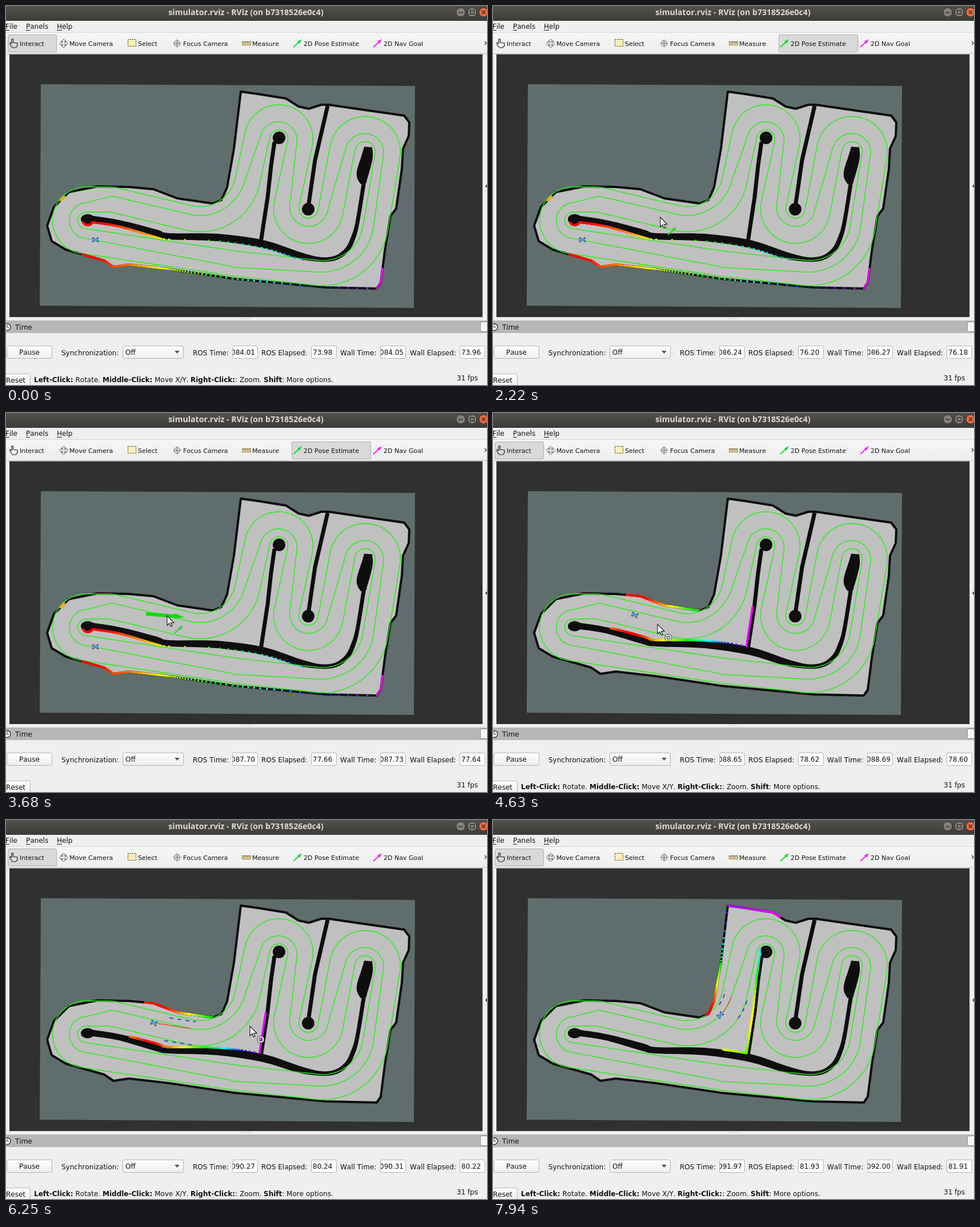
Recreate the animation shown at these times as an HTML page with a canvas. Size 842x664 px, loop 7990 ms.

```html
<!DOCTYPE html>
<html lang="en">
<head>
<meta charset="utf-8">
<title>Simulator view</title>
<style>
html, body { margin: 0; width: 100%; height: 100%; overflow: hidden; background: #efefef; }
canvas { display: block; }
</style>
</head>
<body>
<canvas id="stage" width="842" height="664"></canvas>
<script>
const LOOP = 7990, W = 842, H = 664;
const PICK = 1660, DROP = 4090, DRIVE = 5650;
const UI = '"DejaVu Sans", sans-serif';
const stage = document.getElementById('stage').getContext('2d');
let g = stage;

const pts = s => s.split(' ').map(p => p.split(',').map(Number));
const lerp = (a, b, u) => a + (b - a) * u;
const smooth = u => u * u * (3 - 2 * u);

// The track is a belt around circles: x, y, radius, side (1 right turn, -1 left), racing line bias
const HALF = 22;
const turns = [
  [140, 375.5, 36.5, 1, 7.5],
  [178, 395, 56, 1, -6],
  [340, 289, 84.5, -1, -6.5],
  [477.5, 233, 38, 1, 8],
  [529.5, 355, 39, -1, -8],
  [628.5, 255.5, 40, 1, 8],
  [554, 374, 94, 1, 3],
  [420, 302.5, 150, 1, -8]
];

function makeBelt() {
  const n = turns.length, TAU = 2 * Math.PI, out = [];
  const heading = turns.map(([x, y, r, side], i) => {
    const [x2, y2, r2, side2] = turns[(i + 1) % n], dx = x2 - x, dy = y2 - y;
    return Math.atan2(dy, dx) - Math.asin((r2 * side2 - r * side) / Math.hypot(dx, dy));
  });
  const onArc = (i, h) => {
    const [x, y, r, side] = turns[i % n];
    return [x + r * side * Math.sin(h), y - r * side * Math.cos(h)];
  };
  // phase is a whole number in the middle of each turn
  const push = ([x, y], h, phase) => {
    const i = Math.floor(phase), b = k => turns[(k + n) % n][4];
    out.push({ x, y, h, bias: lerp(b(i), b(i + 1), smooth(phase - i)) });
  };
  for (let i = 0; i < n; i++) {
    const h0 = heading[(i + n - 1) % n], h1 = heading[i], side = turns[i][3];
    const sweep = side * ((side * (h1 - h0) % TAU + TAU) % TAU);
    for (let u = 0; u < 1; u += 1 / 32) push(onArc(i, h0 + sweep * u), h0 + sweep * u, i + (u - 0.5) / 2);
    const a = onArc(i, h1), b = onArc(i + 1, h1);
    for (let u = 0; u < 1; u += 1 / 32) push([lerp(a[0], b[0], u), lerp(a[1], b[1], u)], h1, i + 0.25 + u / 2);
  }
  return out;
}

const belt = makeBelt();
const lane = shift => belt.map(p => [p.x - Math.sin(p.h) * shift(p), p.y + Math.cos(p.h) * shift(p)]);
const race = lane(p => p.bias);
const lanes = [lane(() => -HALF), race, lane(() => HALF)];

// Walls
const outer = pts('411,150 440,154 490,162 512,176 530,180 552,173 565,173 620,181 697,192 706,204 705,228 695,250 693,285 683,355 673,368 663,430 656,485 649,495 560,493 400,478 285,461 215,453 188,457 172,446 105,427 80,412 72,385 84,352 110,326 160,316 215,317 258,321 300,337 362,346 377,340 387,318 399,250');
const spine = ribbon('150,373,11 200,381,11 262,398,13 285,403.5,11 370,405.5,13 450,417,14 510,436,12 550,444,8 578,441,8 597,427,8 607,408,8 615,380,7 627,306,7');
const knob = ribbon('634,247,14 632,265,20 624,295,21 626,311,10');
const midWall = pts('470,238 464,280 458,335 446,414');
const divider = pts('563,175 541,270 530,346');

// Catmull-Rom through open key points of any dimension
function spline(p) {
  const at = i => p[Math.max(0, Math.min(p.length - 1, i))], out = [];
  for (let i = 0; i < p.length - 1; i++) {
    const [a, b, c, d] = [at(i - 1), at(i), at(i + 1), at(i + 2)];
    for (let u = 0; u < 1; u += 0.25) {
      out.push(b.map((v, k) => v + 0.5 * u * (c[k] - a[k] +
        u * (2 * a[k] - 5 * v + 4 * c[k] - d[k] + u * (3 * (v - c[k]) + d[k] - a[k])))));
    }
  }
  return [...out, at(p.length)];
}

// Outline of a band given as x, y, width
function ribbon(s) {
  const p = spline(pts(s));
  const edge = side => p.map(([x, y, w], i) => {
    const a = p[Math.max(0, i - 1)], b = p[Math.min(p.length - 1, i + 1)];
    const h = Math.atan2(b[1] - a[1], b[0] - a[0]);
    return [x + Math.sin(h) * w / 2 * side, y - Math.cos(h) * w / 2 * side];
  });
  return [...edge(1), ...edge(-1).reverse()];
}

const disc = (x, y, r) => Array.from({ length: 12 }, (_, i) =>
  [x + r * Math.cos(i * Math.PI / 6), y + r * Math.sin(i * Math.PI / 6)]);
const edges = (p, closed = true) =>
  p.slice(closed ? 0 : 1).map((q, i) => closed ? [...q, ...p[(i + 1) % p.length]] : [...p[i], ...q]);
const walls = [
  ...edges(outer), ...edges(spine), ...edges(disc(143, 374, 10)), ...edges(disc(478, 231, 11)),
  ...edges(midWall.map(([x, y]) => [x - 3, y]), false)
];

// Drawing helpers
function trace(p, closed) {
  g.beginPath();
  p.forEach(([x, y]) => g.lineTo(x, y));
  if (closed) g.closePath();
}
function fill(p, color) { trace(p, true); g.fillStyle = color; g.fill(); }
function line(p, color, width, closed) {
  trace(p, closed);
  g.strokeStyle = color; g.lineWidth = width; g.stroke();
}
function rect(x, y, w, h, color) { g.fillStyle = color; g.fillRect(x, y, w, h); }
function circle(x, y, r, color, edge, width = 1) {
  g.beginPath(); g.arc(x, y, r, 0, 7);
  if (color) { g.fillStyle = color; g.fill(); }
  if (edge) { g.strokeStyle = edge; g.lineWidth = width; g.stroke(); }
}
function box(x, y, w, h, color, edge = '#b4b4b4') {
  g.beginPath(); g.roundRect(x + 0.5, y + 0.5, w - 1, h - 1, 2.5);
  g.fillStyle = color; g.fill();
  g.strokeStyle = edge; g.lineWidth = 1; g.stroke();
}
function fade(y0, y1, a, b) {
  const c = g.createLinearGradient(0, y0, 0, y1);
  c.addColorStop(0, a); c.addColorStop(1, b);
  return c;
}
function text(s, x, y, size = 12, weight = '') {
  g.font = `${weight} ${size}px ${UI}`;
  g.fontKerning = 'none';
  g.fillStyle = '#111';
  g.fillText(s, x, y);
  return x + g.measureText(s).width;
}
function placed(x, y, angle, draw) {
  g.save(); g.translate(x, y); g.rotate(angle); draw(); g.restore();
}

function drawMap() {
  const ink = '#0e0e0e';
  rect(6, 85, 828, 460, '#303030');
  fill(pts('61,137 716,140 714,529 59,525'), '#5f6e6c');
  g.lineJoin = 'round';
  fill(outer, '#c0c0c0');
  line(outer, ink, 4, true);
  fill(spine, ink);
  fill(knob, ink);
  line(divider, ink, 7);
  line(midWall, ink, 7);
  circle(529, 356, 11, ink);
  circle(478, 231, 11, ink);
  g.beginPath(); g.ellipse(143, 373.5, 12, 9, 0, 0, 7); g.fillStyle = ink; g.fill();
  lanes.forEach(l => line(l, '#22f010', 1.4, true));
}

function poseIcon(x, y, color) {
  line([[x, y + 14], [x + 10, y + 5]], color, 2);
  fill([[x + 7, y + 4], [x + 15, y], [x + 11, y + 8]], color);
}

function windowButton(x, color, glyph) {
  circle(x, 11, 8, color, '#33322e');
  g.strokeStyle = '#33322e'; g.lineWidth = 1.5;
  g.beginPath();
  if (glyph === 'min') { g.moveTo(x - 4, 11.5); g.lineTo(x + 4, 11.5); }
  if (glyph === 'max') g.rect(x - 3.5, 8, 7, 6);
  if (glyph === 'close') { g.moveTo(x - 3, 8); g.lineTo(x + 3, 14); g.moveTo(x + 3, 8); g.lineTo(x - 3, 14); }
  g.stroke();
}

function crossArrows(x, y) {
  for (let i = 0; i < 4; i++) placed(x, y, i * Math.PI / 2, () =>
    line(pts('1.5,-1.5 4,-1.5 4,-4 7.5,0 4,4 4,1.5 1.5,1.5'), '#666', 1));
}

function drawFrame() {
  rect(0, 0, W, H, '#efefef');
  rect(0, 0, W, 26, fade(0, 26, '#53514b', '#3c3b37'));
  g.textAlign = 'center';
  g.font = 'bold 14.1px "Open Sans", sans-serif';
  g.fillStyle = '#dfdbd2';
  g.fillText('simulator.rviz - RViz (on b7318526e0c4)', 420, 16);
  g.textAlign = 'left';
  windowButton(796, '#84817a', 'min');
  windowButton(816, '#84817a', 'max');
  windowButton(836, '#ee6a3c', 'close');

  [['File', -1, 7], ['Panels', 35, 7], ['Help', 89, 9]].forEach(([s, x, w]) => {
    text(s, x, 40);
    rect(x, 42, w, 1, '#111');
  });
  rect(0, 46, W, 37, fade(46, 83, '#f6f6f6', '#eeeeee'));
  rect(0, 46, W, 1, '#d6d6d6');
  rect(0, 83, W, 1, '#c4c4c4');
  rect(5, 84, 830, 1, '#a8a8a8');
  drawMap();
  rect(834, 85, 1, 460, '#c8c8c8');
  fill([[842, 312], [842, 319], [839, 315.5]], '#444');

  for (let x = 413; x < 430; x += 3) rect(x, 547, 1, 1, '#999');
  rect(0, 551, W, 22, '#b7b7b7');
  circle(2, 562.5, 6, '#f4f4f4', '#333', 1.4);
  line([[2, 558.5], [2, 563], [5, 563]], '#333', 1);
  text('Time', 16, 567);
  box(830, 553, 18, 18, '#f6f6f6', '#8c8c8c');

  box(1, 595, 80, 23, fade(595, 618, '#ffffff', '#ededed'));
  text('Pause', 23, 611);
  text('Synchronization:', 97, 612);
  box(204, 595, 107, 23, fade(595, 618, '#ffffff', '#ededed'));
  text('Off', 209, 611);
  fill([[295, 604], [304, 604], [299.5, 609]], '#555');
  [['ROS Time:', 327], ['ROS Elapsed:', 447], ['Wall Time:', 585], ['Wall Elapsed:', 707]]
    .forEach(([s, x]) => text(s, x, 612));
  box(-5, 644, 48, 26, fade(644, 668, '#ffffff', '#ededed'));
  text('Reset', 0, 660);
  text('31 fps', 789, 656);
}

function drawTools(posing) {
  if (posing) box(500, 50, 139, 31, '#d9d9d9', '#adadad');
  else box(3, 50, 86, 31, '#d9d9d9', '#adadad');
  line(pts('10,66 10,58 12.5,58 12.5,64 20,65 20,70 17,73 11,73 7,67 7,64 10,66'), '#222', 1.2);
  crossArrows(101, 65.5);
  rect(213, 58, 15, 13, '#f8efb4');
  g.setLineDash([2, 1.5]);
  line(pts('213.5,58.5 227.5,58.5 227.5,70.5 213.5,70.5'), '#333', 1, true);
  g.setLineDash([]);
  circle(299.5, 65.5, 5, null, '#888', 1.3);
  circle(299.5, 65.5, 2, null, '#888');
  line([[292, 65.5], [307, 65.5]], '#888', 1);
  line([[299.5, 58], [299.5, 73]], '#888', 1);
  rect(413, 62, 16, 7, '#8a7a55');
  rect(414, 63, 14, 5, '#e5d6a4');
  for (let x = 416; x < 428; x += 3) rect(x, 63, 1, 3, '#6b5d3a');
  poseIcon(503, 58, '#14dc32');
  poseIcon(643, 58, '#ee22ee');
  line([[838, 62], [841, 65], [838, 68]], '#333', 1.2);
  [['Interact', 24], ['Move Camera', 111], ['Select', 231], ['Focus Camera', 310], ['Measure', 431],
    ['2D Pose Estimate', 521], ['2D Nav Goal', 661]].forEach(([s, x]) => text(s, x, 70, 11));
}

function drawHint() {
  [['Left-Click:', ' Rotate.', 49], ['Middle-Click:', ' Move X/Y.', 169],
    ['Right-Click:', ': Zoom.', 323], ['Shift', ': More options.', 451]]
    .forEach(([b, s, x]) => text(s, text(b, x, 659, 12, 'bold'), 659));
}

function drawClocks(t) {
  const ros = 84.01 + t * 0.001002, elapsed = ros - 10.035;
  [[396, -2, ros], [534, 3, elapsed], [655, -1, ros + 0.035], [794, 3, elapsed - 0.02]].forEach(([x, pad, v]) => {
    box(x, 595, 45, 23, '#fff');
    g.save();
    g.beginPath(); g.rect(x + 1, 596, 43, 21); g.clip();
    text((pad < 0 ? '0' : '') + v.toFixed(2), x + pad, 611);
    g.restore();
  });
}

// Robot on the racing line; s is the distance driven
const route = (() => {
  let s = 0;
  const r = race.map(([x, y], i) => {
    if (i) s += Math.hypot(x - race[i - 1][0], y - race[i - 1][1]);
    return { s, x, y };
  });
  const gap = p => Math.hypot(p.x - 249, p.y - 353);
  const start = r.reduce((a, b) => gap(b) < gap(a) ? b : a).s;
  return r.map(p => ({ ...p, s: p.s - start }));
})();

function along(s) {
  const i = Math.max(1, route.findIndex(p => p.s > s));
  const a = route[i - 1], b = route[i], u = (s - a.s) / (b.s - a.s);
  const dir = Math.atan2(b.y - a.y, b.x - a.x), off = 6 * Math.max(0, 1 - s / 80);
  return { s, x: lerp(a.x, b.x, u) - Math.sin(dir) * off, y: lerp(a.y, b.y, u) + Math.cos(dir) * off, dir };
}

function robotAt(t) {
  if (t < DROP) return { x: 156, y: 409.5, dir: 0 };
  const p = along(30 * (Math.max(0, t - DRIVE) / 1000) ** 2);
  return { ...p, dir: p.dir + 0.12 * Math.max(0, 1 - p.s / 60) };
}

// Laser scan
const FOV = 2.29, STEP = Math.PI / 540;
let scanKey = '', scan = [];
function castScan(bot) {
  const key = [bot.x, bot.y, bot.dir].join();
  if (key === scanKey) return scan;
  scanKey = key;
  scan = [];
  for (let a = bot.dir - FOV; a <= bot.dir + FOV; a += STEP) {
    const dx = Math.cos(a), dy = Math.sin(a);
    let best = Infinity;
    for (const [x1, y1, x2, y2] of walls) {
      const ex = x2 - x1, ey = y2 - y1, px = x1 - bot.x, py = y1 - bot.y;
      const det = dx * ey - dy * ex;
      if (!det) continue;
      const d = (px * ey - py * ex) / det, u = (px * dy - py * dx) / det;
      if (d > 0 && d < best && u >= 0 && u <= 1) best = d;
    }
    if (best < Infinity) scan.push({ x: bot.x + dx * best, y: bot.y + dy * best, d: best });
  }
  return scan;
}

function drawScan(bot) {
  const hits = castScan(bot), ds = hits.map(h => h.d);
  const near = Math.min(...ds), far = Math.max(...ds);
  hits.forEach(h => rect(h.x - 1.6, h.y - 1.6, 3.2, 3.2,
    `hsl(${300 * (h.d - near) / (far - near)},100%,50%)`));
}

function drawPlan(bot) {
  const u = Math.min(1, bot.s / 157);
  const strip = (from, length, side) => {
    const out = [];
    for (let s = from; s <= from + length; s += 3) {
      const p = along(bot.s + s);
      out.push([p.x - Math.sin(p.dir) * side, p.y + Math.cos(p.dir) * side]);
    }
    return out;
  };
  line(strip(0, 70 - 30 * u, 0), '#d8481c', 1.3);
  g.setLineDash([7, 7]);
  [-13, 28].forEach(side => line(strip(26 - 12 * u, 49 - 14 * u, side), '#2c3cc0', 1.8));
  g.setLineDash([]);
}

function drawRobot(bot) {
  placed(bot.x, bot.y, bot.dir, () => {
    [-5, 3].forEach(x => [-4, 2].forEach(y => rect(x, y, 3, 2, '#2b3a4a')));
    rect(-4, -2.5, 8, 5, '#3f8fe0');
    rect(-6, -1, 12, 2, '#5a9be0');
  });
}

// Pointer stops: time, x, y
const stops = pts('250,440,690 1030,467,42 1600,560,62 2220,293,370 3200,245,352 3350,245,352 3680,282,355 3950,288,370 5850,288,370 6250,427,361 6440,860,400');

function drawPointer(t, posing) {
  const i = stops.findIndex(s => s[0] >= t);
  if (i < 1) return;
  const a = stops[i - 1], b = stops[i], u = smooth((t - a[0]) / (b[0] - a[0]));
  const x = lerp(a[1], b[1], u), y = lerp(a[2], b[2], u);
  if (posing && t > 3350) placed(245, 352, Math.atan2(y - 352, x - 245), () =>
    fill(pts('0,-3 50,-3 50,-5 67,0 50,5 50,3 0,3'), '#0cdc0c'));
  placed(x, y, 0, () => {
    if (y < 84) {
      fill(pts('3,1 5,0 7,2 9,9 14,11 16,14 16,19 13,24 5,24 0,17 -1,14 2,13 5,15'), '#0a0a0a');
      return;
    }
    const arrow = pts('0,0 0,17 4,13.5 6.5,19 9,18 6.5,12.5 12,12.5');
    fill(arrow, '#fff');
    line(arrow, '#111', 1.1, true);
    if (y > 545) return;
    if (posing) poseIcon(13, 17, '#1fd02c');
    else {
      circle(19, 23.5, 4.5, null, '#333', 4);
      circle(19, 23.5, 4.5, null, '#fff', 2);
    }
  });
}

const base = document.createElement('canvas');
base.width = W; base.height = H;
g = base.getContext('2d');
drawFrame();
g = stage;

function render(now) {
  const t = now % LOOP, posing = t >= PICK && t < DROP, bot = robotAt(t);
  g.drawImage(base, 0, 0);
  drawTools(posing);
  if (!posing) drawHint();
  drawClocks(t);
  drawScan(bot);
  if (t >= DRIVE) drawPlan(bot);
  drawRobot(bot);
  drawPointer(t, posing);
  requestAnimationFrame(render);
}
render(0);
</script>
</body>
</html>
```
